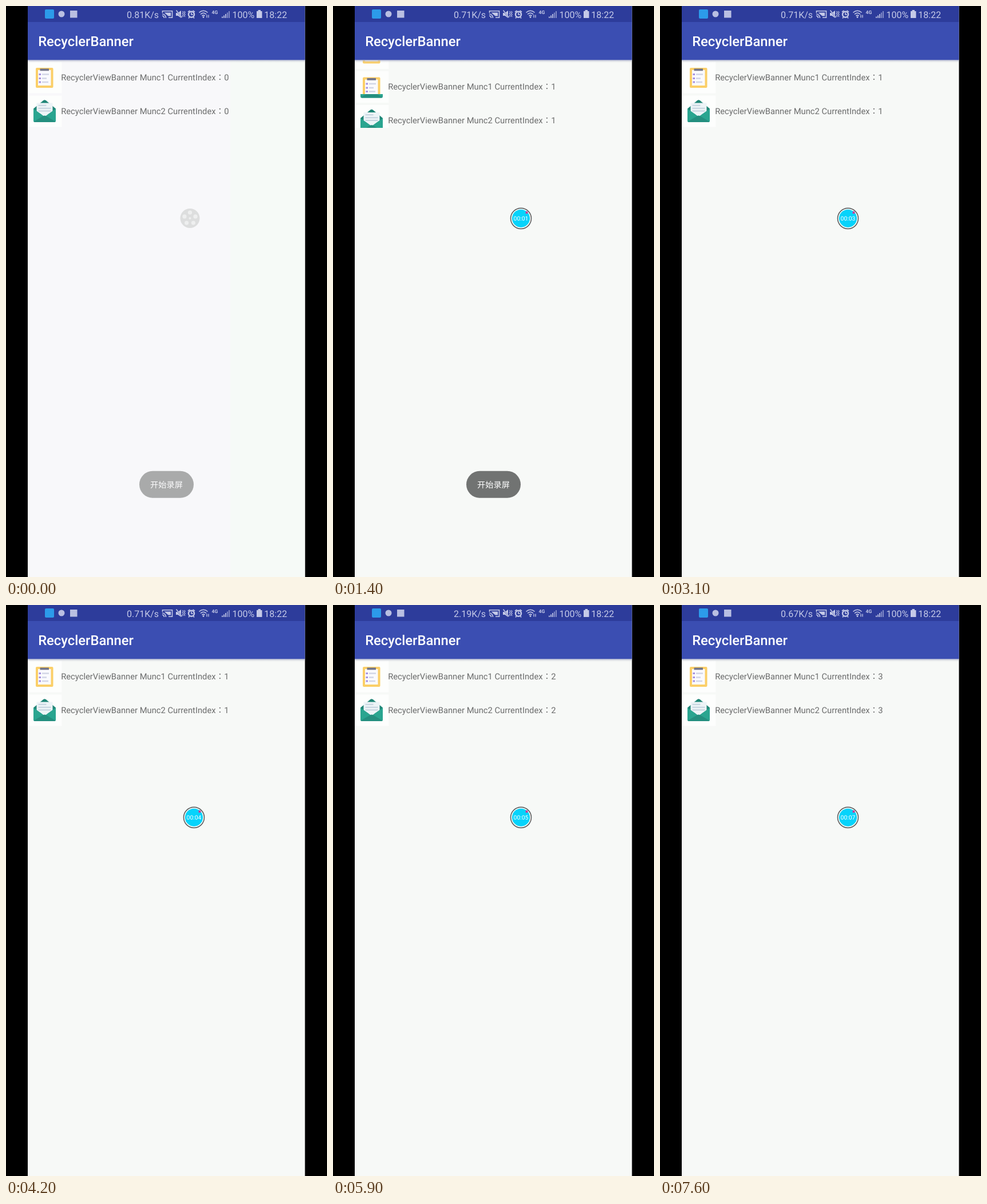
An HTML page that plays this animation: 561x998 px, repeating every 8 s.

```html
<!DOCTYPE html>
<html lang="zh-CN">
<head>
<meta charset="utf-8">
<title>RecyclerBanner</title>
<style>
  html, body { margin: 0; width: 100%; height: 100%; overflow: hidden; background: #000; }
  svg { display: block; }
  #stage { width: 100vw; height: 100vh; }
  text { font-family: Roboto, "Noto Sans CJK JP", "Noto Sans CJK", sans-serif; text-rendering: geometricPrecision; }
  .status { font-size: 16px; fill: #c5cae8; }
  .title { font-size: 23.8px; font-weight: 500; fill: #fff; }
  .label { font-size: 14.76px; fill: #6b6c6c; }
  .toast { font-family: "Noto Sans CJK SC", "Noto Sans CJK", sans-serif; font-size: 14.2px; fill: #fff; text-anchor: middle; }
  .clock { font-size: 10.4px; fill: #fff; text-anchor: middle; }
</style>
</head>
<body>
<svg id="stage" viewBox="0 0 561 998" preserveAspectRatio="none">
  <defs>
    <linearGradient id="shade" x2="0" y2="1">
      <stop offset="0" stop-color="#8d95c4" stop-opacity=".9"/>
      <stop offset=".4" stop-color="#b4b8cc" stop-opacity=".45"/>
      <stop offset="1" stop-color="#c4c6cc" stop-opacity="0"/>
    </linearGradient>
    <g id="clipboard">
      <rect x="14" y="13" width="30.5" height="35" rx="2" fill="#fbcf68"/>
      <rect x="18" y="17" width="22.5" height="27" fill="#fafaff"/>
      <rect x="21.500" y="14.500" width="15.500" height="3.800" fill="#72758a"/>
      <path d="M19.500 24.500h3.500M19.500 31.500h3.500M19.500 38h3.500" stroke="#a48fdf" stroke-width="3.200"/>
      <path d="M25 24.500h12M25 31.500h8M25 38h11" stroke="#d2d6e6" stroke-width="2.600"/>
    </g>
    <g id="envelope">
      <path d="M10 25.500L27 11.200q2.500-2 5 0L49 25.500V36H10z" fill="#1f8576"/>
      <path d="M15.500 15.500h28V30L29.500 39.500 15.500 30z" fill="#edf4f7"/>
      <path d="M18.500 19.800h14M18.500 24.800h22M18.500 29.600h22" stroke="#c5d3df" stroke-width="2"/>
      <path d="M10 25.500L29.500 39.500 49 25.500V46.500q0 2.500-2.500 2.500h-34q-2.500 0-2.500-2.500z" fill="#2aa590"/>
      <path d="M10.500 48L27.500 38q2-1.200 4 0L48.500 48q-.8 1-2 1h-34q-1.200 0-2-1z" fill="#248f7f"/>
    </g>
  </defs>

  <rect width="561" height="998"/>
  <rect x="38" width="484.500" height="998" fill="#f7f9f7"/>
  <g id="tint">
    <rect x="38" y="94" width="354" height="904" fill="#f8f8fa"/>
    <rect x="392" y="94" width="130.500" height="904" fill="#f6faf7"/>
  </g>
  <g id="rows"></g>

  <rect x="38" y="28" width="484.500" height="66.300" fill="#3b4eb2"/>
  <rect x="38" width="484.500" height="28" fill="#2d3c9b"/>
  <rect x="38" y="94" width="484.500" height="5" fill="url(#shade)"/>
  <text class="title" x="56.200" y="70.300">RecyclerBanner</text>

  <!-- status bar -->
  <rect x="68" y="6" width="16" height="16" rx="2" fill="#2c9bea"/>
  <circle cx="97" cy="14" r="5.500" fill="#b9bfe2"/>
  <rect x="112" y="8" width="12.500" height="12.500" fill="#b9bfe2"/>
  <text class="status" id="speed" x="211" y="20.600"></text>
  <g fill="none" stroke="#c5cae8" stroke-width="1.600">
    <path d="M273.500 12V8.800H290.500V20.200H284"/>
    <path d="M273 14q6 .5 6.500 7M273 17q3.300.5 3.500 4"/>
    <path d="M276.500 11.500H288V17.500H283.500L276.500 11.500z" fill="#c5cae8" stroke="none"/>
    <path d="M297 12h3.500L306 8V21L300.500 17H297z" fill="#c5cae8" stroke="none"/>
    <path d="M298 8.500L308 20.500" stroke="#2d3c9b" stroke-width="2.200"/>
    <path d="M297.500 7.500L307.500 20"/>
    <path d="M308.500 9l1.500 2-1.500 2 1.500 2-1.500 2 1.500 2M311.500 9l1.500 2-1.500 2 1.500 2-1.500 2 1.500 2" stroke-width="1.200"/>
    <circle cx="324" cy="14.800" r="5" stroke-width="2.400"/>
    <path d="M324 11.500V15H327M318 10.500L321.500 7.800M330 10.500L326.500 7.800M320.500 19.500L319 21.500M327.500 19.500L329 21.500"/>
    <path d="M337.500 11.500q7.500-6.500 15 0M340 14.500q5-4.500 10 0M342.500 17.300q2.500-2.200 5 0"/>
    <circle cx="345" cy="19.500" r="1.400" fill="#c5cae8" stroke="none"/>
    <path d="M351 20.500V15.500M354 15.500V20.500" stroke-width="1.300"/>
    <path d="M378 21V18.500M381 21V16.500M384 21V14" stroke-width="1.700"/>
    <path d="M387 21V11.500M390 21V9" stroke-width="1.500" opacity=".75"/>
  </g>
  <text x="359.500" y="14.300" font-size="8.500" font-weight="700" fill="#c5cae8">4G</text>
  <text class="status" x="395.500" y="20.600">100%</text>
  <path d="M438 9h2.500V7h4.500V9h2.500V21h-9.500z" fill="#c5cae8"/>
  <text class="status" x="451.300" y="20.600">18:22</text>

  <g id="wheel"><circle cx="321.500" cy="371" r="17" fill="#dddede"/></g>
  <g id="timer">
    <circle cx="328.500" cy="371.300" r="18" fill="#fff" stroke="#5f6363" stroke-width="1.700"/>
    <circle cx="328.500" cy="371.300" r="15.600" fill="#06d3fb"/>
    <circle cx="338.500" cy="361" r="2.200" fill="#c5429c"/>
    <text class="clock" id="clock" x="328.500" y="375.300"></text>
  </g>
  <g id="toast">
    <rect x="233" y="812.800" width="95" height="47" rx="23.500" fill="#717372"/>
    <text class="toast" x="280.500" y="842">开始录屏</text>
  </g>
</svg>
<script>
const LOOP = 8000, STEP = 100, ROW = 59, SLIDE = 400;
const flips = [1310, 4310, 7270];
const speeds = ["0.81K/s", "0.71K/s", "2.19K/s", "0.67K/s"];
const $ = id => document.getElementById(id);
const clamp = v => Math.max(0, Math.min(1, v));
const easeOut = p => 1 - (1 - p) ** 5;
const fade = (id, v) => $(id).setAttribute("opacity", clamp(v));

// lang="ja" centres the full-width colon
const cell = (icon, y) => `<g transform="translate(0 ${y})">
  <rect y="2.500" width="59.500" height="55" fill="#fdfefd"/>
  <use href="#${icon}"/><text class="label" lang="ja" x="58.200" y="35"></text></g>`;

$("rows").innerHTML = ["clipboard", "envelope"].map((icon, i) =>
  `<svg x="38" y="${95 + i * ROW}" width="484.500" height="${ROW}" overflow="hidden">
    <g class="strip">${cell(icon, 0)}${cell(icon, ROW)}</g></svg>`).join("");
const strips = [...document.querySelectorAll(".strip")];

// Holes of the fading button
const hole = (x, y, r) => `<circle cx="${x}" cy="${y}" r="${r}" fill="#eeefef"/>`;
for (let i = 0; i < 5; i++) {
  const a = (i * 72 - 90) * Math.PI / 180;
  $("wheel").innerHTML += hole(321.5 + 10 * Math.cos(a), 371 + 10 * Math.sin(a), 3.6);
}
$("wheel").innerHTML += hole(321.5, 371, 2);

function draw(t) {
  const turn = flips.filter(f => f <= t).length;
  const shift = turn ? ROW * easeOut(clamp((t - flips[turn - 1]) / SLIDE)) : 0;
  const first = Math.max(0, turn - 1);
  strips.forEach((strip, row) => {
    strip.setAttribute("transform", `translate(0 ${-shift})`);
    strip.querySelectorAll("text").forEach((label, i) => {
      label.textContent = `RecyclerViewBanner Munc${row + 1} CurrentIndex：${first + i}`;
    });
  });
  $("speed").textContent = speeds[turn];
  $("clock").textContent = "00:0" + Math.max(0, Math.floor((t - 100) / 1000));
  fade("tint", t < 1400 ? 1 : 0);
  fade("wheel", 1 - t / 200);
  fade("timer", t / 300);
  fade("toast", Math.min(0.58 + t / 700, (2200 - t) / 330));
}

function tick(now) {
  draw(Math.floor((now % LOOP) / STEP) * STEP);
  requestAnimationFrame(tick);
}
draw(0);
requestAnimationFrame(tick);
</script>
</body>
</html>
```
